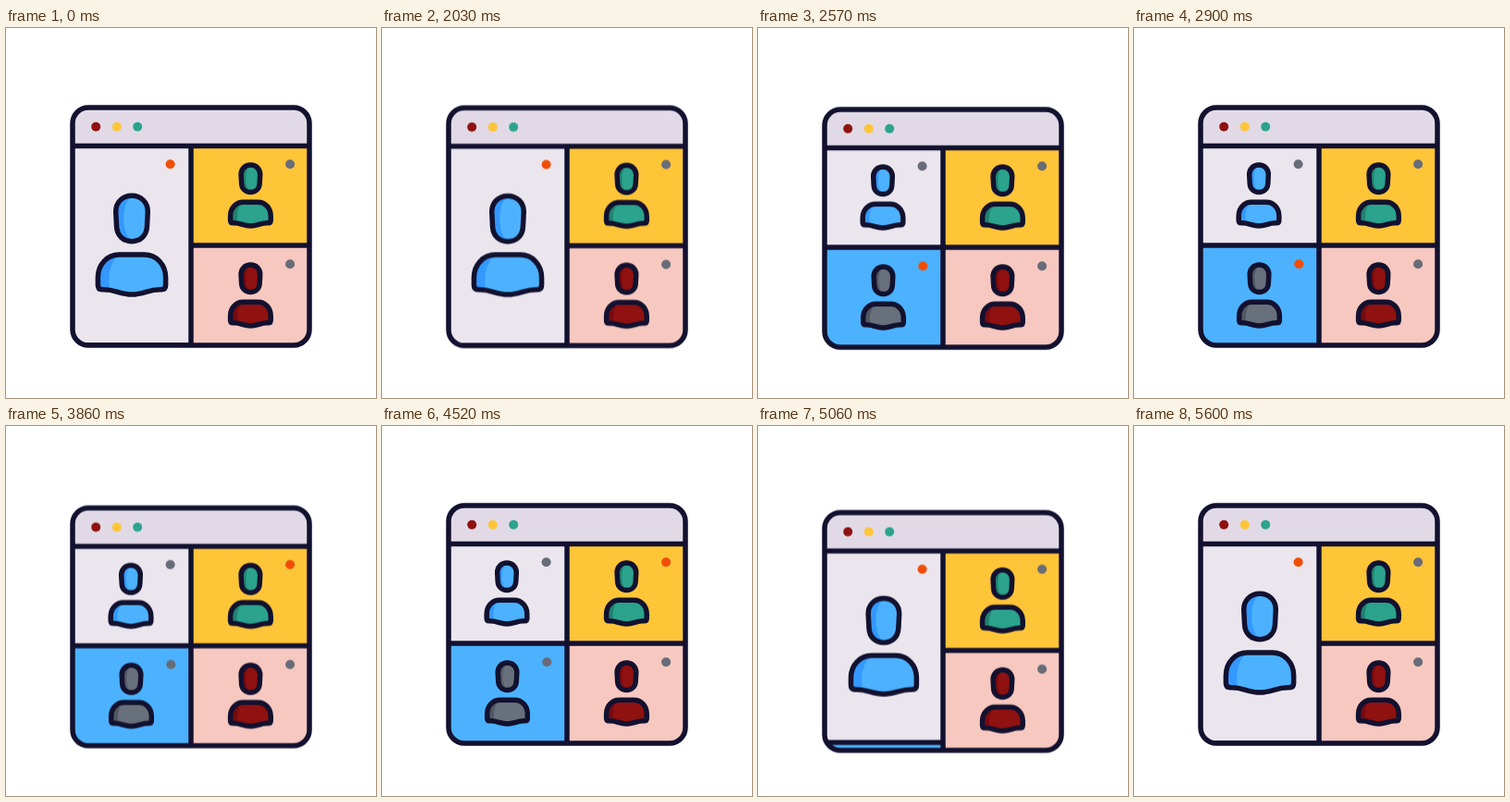
Animation, 400 px wide and 400 px high, one loop 5660 ms. Source, as an HTML page without scripts:

```html
<!DOCTYPE html>
<html lang="en">
<head>
<meta charset="utf-8">
<title>Video call</title>
<style>
  /* --solo: 1 = one large speaker on the left, 0 = two by two grid */
  @property --solo { syntax: "<number>"; inherits: true; initial-value: 1; }

  html, body { margin: 0; width: 100%; height: 100%; overflow: hidden; background: #fff; }
  svg {
    --ink: #12112f; --on: #f04e08; --off: #686c78;
    display: block; width: 100%; height: 100%;
    animation: layout 5660ms infinite;
  }
  .window { animation: bob 5660ms infinite; }
  .line { fill: none; stroke: var(--ink); stroke-width: 5.5px; }
  .outline { fill: none; stroke: var(--ink); stroke-width: calc(5.5px / var(--k, 1)); stroke-linejoin: round; }
  .base { fill: var(--dark); }
  .lit { fill: var(--light); }

  .blue { --light: #4cb2ff; --dark: #3398ff; }
  .green { --light: #2ba38d; --dark: #21816f; }
  .red { --light: #8f1110; --dark: #760b10; }
  .gray { --light: #68707b; --dark: #525661; }

  .lead { --k: calc(1 + .68 * var(--solo)); }
  .lead .head {
    transform: translate(calc(135px + 1px * var(--solo)), calc(162.8px + 43.2px * var(--solo))) scale(var(--k));
  }
  .lead .body {
    transform: translate(calc(135px + 1px * var(--solo)), calc(200.9px + 65.3px * var(--solo))) scale(var(--k));
  }
  .newcomer { transform: translateY(calc(108px * var(--solo))); }

  .light { fill: var(--off); animation: 5660ms step-end infinite; }
  .tl { animation-name: talk-tl; }
  .bl { animation-name: talk-bl; }
  .tr { animation-name: talk-tr; }
  .br { animation-name: talk-br; }

  @keyframes layout {
    0%, 35.51% { --solo: 1; animation-timing-function: cubic-bezier(.4, 0, .2, 1); }
    45.05%, 83.04% { --solo: 0; animation-timing-function: cubic-bezier(.4, 0, .2, 1); }
    92.58%, 100% { --solo: 1; }
  }
  @keyframes bob {
    0%, 35.4%, 51.2%, 63.8%, 73.5%, 82.9%, 98.9%, 100% {
      transform: none; animation-timing-function: cubic-bezier(.35, 0, .5, 1);
    }
    40.2%, 87.7% { transform: translateY(11.4px); animation-timing-function: cubic-bezier(.15, .2, .25, 1); }
    67% { transform: translateY(3px); animation-timing-function: cubic-bezier(.3, 0, .4, 1); }
  }
  @keyframes talk-tl {
    0%, 84.63% { fill: var(--on); }
    36.93% { fill: var(--off); }
  }
  @keyframes talk-bl {
    0%, 58.65% { fill: var(--on); }
    55.47%, 65.37% { fill: var(--off); }
  }
  @keyframes talk-br {
    0%, 58.65%, 79.85% { fill: var(--off); }
    55.47%, 76.14% { fill: var(--on); }
  }
  @keyframes talk-tr {
    0%, 76.14%, 84.63% { fill: var(--off); }
    65.37%, 79.85% { fill: var(--on); }
  }
</style>
</head>
<body>
<svg viewBox="0 0 400 400">
  <defs>
    <path id="head-shape" d="M0-14.7C6-14.7 10.3-10.5 10.3-4.5L9.8 5C9.5 11 5.6 14.7 0 14.7S-9.5 11-9.8 5L-10.3-4.5C-10.3-10.5-6-14.7 0-14.7Z"/>
    <path id="body-shape" d="M-8-12.6H8C16-12.6 21.8-6 21.8 2V7Q21.8 9.8 19 9.9C11 9.5 8 13 0 13S-11 9.5-19 9.9Q-21.8 9.8-21.8 7V2C-21.8-6-16-12.6-8-12.6Z"/>
    <clipPath id="head-clip"><use href="#head-shape"/></clipPath>
    <clipPath id="body-clip"><use href="#body-shape"/></clipPath>
    <clipPath id="window-clip"><rect x="72" y="86" width="256" height="257" rx="17"/></clipPath>

    <g id="head">
      <use class="base" href="#head-shape"/>
      <path class="lit" clip-path="url(#head-clip)" d="M1-15C-4-12-5.2-6-5.2 0S-4 12 1 15H12V-15Z"/>
      <use class="outline" href="#head-shape"/>
    </g>
    <g id="body">
      <use class="base" href="#body-shape"/>
      <path class="lit" clip-path="url(#body-clip)" d="M-7-13C-14-9-16 0-14 14H23V-13Z"/>
      <use class="outline" href="#body-shape"/>
    </g>
    <g id="person">
      <use href="#head" y="-38.1"/>
      <use href="#body"/>
    </g>
  </defs>

  <g class="window">
    <g clip-path="url(#window-clip)">
      <rect x="70" y="84" width="260" height="44" fill="#e1dae6"/>
      <circle cx="97.2" cy="106.8" r="5" fill="#8f1110"/>
      <circle cx="119.8" cy="106.8" r="5" fill="#ffc538"/>
      <circle cx="142.2" cy="106.8" r="5" fill="#2ba38d"/>

      <rect x="70" y="127" width="130" height="218" fill="#ebe5ed"/>
      <g class="lead blue">
        <use class="head" href="#head"/>
        <use class="body" href="#body"/>
      </g>
      <circle class="light tl" cx="177.6" cy="147.2" r="5"/>

      <g class="newcomer">
        <rect x="70" y="235" width="130" height="110" fill="#4cb2ff"/>
        <use class="gray" href="#person" x="135.5" y="308.9"/>
        <circle class="light bl" cx="178.3" cy="255.2" r="5"/>
        <path class="line" d="M70 235H200"/>
      </g>

      <rect x="200" y="127" width="130" height="108" fill="#ffc538"/>
      <use class="green" href="#person" x="264.4" y="200.9"/>
      <circle class="light tr" cx="307.1" cy="147.2" r="5"/>

      <rect x="200" y="235" width="130" height="110" fill="#f6c8c0"/>
      <use class="red" href="#person" x="264.4" y="308.9"/>
      <circle class="light br" cx="307.1" cy="255.2" r="5"/>
    </g>
    <path class="line" d="M72 127.5H328M200 127.5V343M200 235H328"/>
    <rect class="line" x="72" y="86" width="256" height="257" rx="17"/>
  </g>
</svg>
</body>
</html>
```
